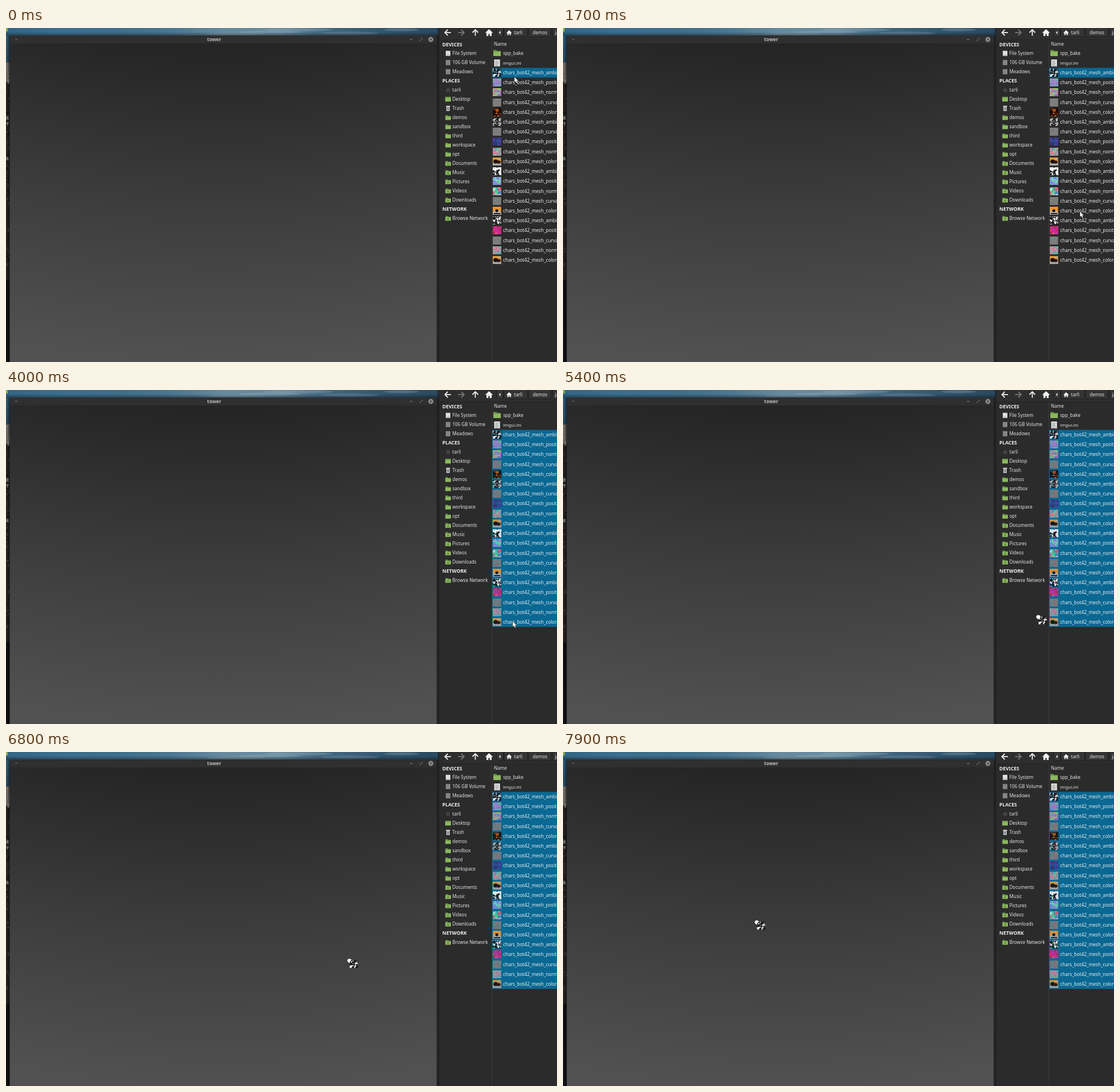
An HTML page with a canvas for the animation above (8 s loop, 961 px wide and 583 px high).

```html
<!DOCTYPE html>
<html lang="en">
<head>
<meta charset="utf-8">
<title>Drag files</title>
<style>
html, body { margin: 0; width: 100%; height: 100%; overflow: hidden; background: #2b2b2b; }
canvas { display: block; }
</style>
</head>
<body>
<canvas id="stage" width="961" height="583"></canvas>
<script>
const W = 961, H = 583, LOOP = 8000, STEP = 100, ROW = 17.21, FIRST_ROW = 78;
const SELECT_AT = 4000, DRAG_AT = 4900, FONT = '"Noto Sans", "Open Sans", sans-serif';
const screen = document.getElementById('stage').getContext('2d');
let g = screen;

// Pointer positions: [ms, x, y]
const arrowPath = [[0, 886, 85], [400, 891, 78], [1000, 891, 78], [1100, 892, 81], [1300, 898, 130],
  [1500, 905, 220], [1700, 901, 320], [1900, 891, 384], [2400, 883, 403.5]];
const dragPath = [[4900, 871, 397], [5400, 824, 392], [5700, 779, 391], [6200, 716, 384],
  [6600, 650, 373], [6800, 593.5, 360], [7500, 393, 318], [7900, 333, 293]];

const palettes = {
  ambi: ['#151515', '#fff', '#eee', '#111', '#ddd', '#222'],
  spots: ['#0a0a0a', '#fff', '#111', '#eee', '#000'],
  dim: ['#222', '#ccc', '#555', '#111', '#999'],
  curva: ['#7c7c7c', '#838383', '#767676', '#888'],
  iris: ['#8f8fc0', '#b07ad0', '#70b498', '#a884d4', '#7c7ad0', '#98a8a8'],
  norm: ['#b48cb0', '#e0569a', '#40b8a8', '#7c70d8', '#e09a60', '#8cd078'],
  pale: ['#9a9aa0', '#e07c98', '#58b4a8', '#8078c0', '#c4b088'],
  fire: ['#1c0a06', '#120404', '#c86418', '#481408', '#1c0804'],
  navy: ['#38388c', '#4a3a9c', '#2c4c94', '#56429c', '#34346c'],
  mint: ['#8c7cd8', '#60d890', '#a488e0', '#70e0b0', '#7c8ce0'],
  vivid: ['#9ca8b0', '#30c8a0', '#e05070', '#d8e8d0', '#4878d8', '#40d880'],
  rose: ['#d02c70', '#e03c50', '#c430a0', '#e85088', '#b82850'],
  rust: ['#e09a38'],
  amber: ['#f0962c'],
};
const files = [['ambient', 'ambi'], ['position', 'iris'], ['normal', 'norm'], ['curvature', 'curva'], ['color', 'fire'],
  ['ambient', 'dim'], ['curvature', 'curva'], ['position', 'navy'], ['normal', 'pale'], ['color', 'rust'],
  ['ambient', 'spots'], ['position', 'mint'], ['normal', 'vivid'], ['curvature', 'curva'], ['color', 'amber'],
  ['ambient', 'ambi'], ['position', 'rose'], ['curvature', 'curva'], ['normal', 'pale'], ['color', 'rust']];
const places = ['#DEVICES', 'File System', '106 GB Volume', 'Meadows', '#PLACES', 'tarli', 'Desktop', 'Trash',
  'demos', 'sandbox', 'third', 'workspace', 'opt', 'Documents', 'Music', 'Pictures', 'Videos', 'Downloads',
  '#NETWORK', 'Browse Network'];

function random(seed) {
  return () => {
    seed = (seed + 0x6d2b79f5) | 0;
    let n = Math.imul(seed ^ (seed >>> 15), seed | 1);
    n ^= n + Math.imul(n ^ (n >>> 7), n | 61);
    return ((n ^ (n >>> 14)) >>> 0) / 4294967296;
  };
}

function rect(x, y, w, h, color) {
  g.fillStyle = color;
  g.fillRect(x, y, w, h);
}

function text(str, x, y, color = '#e4e4e4', size = 8, weight = 400, align = 'left') {
  g.font = `${weight} ${size}px ${FONT}`;
  g.textAlign = align;
  g.fillStyle = color;
  g.fillText(str, x, y + 3);
}

function shape(x, y, points, fill, stroke, close = true, width = 1) {
  g.beginPath();
  for (let i = 0; i < points.length; i += 2) g.lineTo(x + points[i], y + points[i + 1]);
  if (close) g.closePath();
  g.lineWidth = width;
  if (stroke) { g.strokeStyle = stroke; g.stroke(); }
  if (fill) { g.fillStyle = fill; g.fill(); }
}

function disc(x, y, rx, ry, color) {
  g.beginPath();
  g.ellipse(x, y, rx, ry, 0, 0, 7);
  g.fillStyle = color;
  g.fill();
}

function ramp(x0, y0, x1, y1, colors) {
  const grad = g.createLinearGradient(x0, y0, x1, y1);
  colors.forEach((c, i) => grad.addColorStop(i / (colors.length - 1), c));
  return grad;
}

// Charred patch on an orange and grey ground
function drawColorMap(x, y, kind) {
  rect(x, y + 9, 15, 5, '#a8a8a8');
  if (kind === 'amber') {
    disc(x + 7, y + 10, 6, 4, '#b4b4b4');
    disc(x + 7, y + 7, 2.6, 2.4, '#151010');
    rect(x + 2, y + 11, 11, 2, '#2a1a14');
  } else {
    disc(x + 5, y + 7, 4, 3.6, '#1c0c08');
    disc(x + 10, y + 8, 3.6, 2.8, '#2c100a');
    rect(x + 10, y + 1, 4, 3, '#b0a89c');
  }
}

function thumb(x, y, kind, seed) {
  const colors = palettes[kind], rnd = random(seed * 7919), noise = kind === 'curva';
  const size = /iris|mint|rose|navy|spots/.test(kind) ? 2.3 : noise ? 0.8 : 1.5;
  g.save();
  g.beginPath();
  g.rect(x, y, 14.5, 14);
  g.clip();
  rect(x, y, 15, 14, colors[0]);
  if (colors.length === 1) drawColorMap(x, y, kind);
  else for (let i = 0; i < 70; i++) {
    const r = size * (0.5 + rnd());
    disc(x + rnd() * 15, y + rnd() * 14, r, r * (0.6 + rnd() * 0.7), colors[Math.floor(rnd() * colors.length)]);
  }
  g.restore();
}

function folder(x, y, w, h) {
  rect(x, y, w * 0.45, h, '#6f9a48');
  rect(x, y + h * 0.15, w, h * 0.85, '#6f9a48');
  rect(x, y + h * 0.3, w, h * 0.7, '#8db85f');
}

function house(x, y, s, color) {
  shape(x, y, [0, -s, s * 1.15, 0.1 * s, s * 0.75, 0.1 * s, s * 0.75, s, s * 0.2, s, s * 0.2, s * 0.4,
    -s * 0.2, s * 0.4, -s * 0.2, s, -s * 0.75, s, -s * 0.75, 0.1 * s, -s * 1.15, 0.1 * s], color);
}

function toolbarArrow(x, y, angle, color) {
  g.save();
  g.translate(x, y);
  g.rotate(angle);
  shape(0, 0, [0, -5, -5, 0, 0, 5], null, color, false, 1.8);
  shape(0, 0, [-4, 0, 5.5, 0], null, color, false, 1.8);
  g.restore();
}

function drawDesktop() {
  rect(0, 0, 756, 14, ramp(0, 0, 756, 0,
    ['#336683', '#3c6f8e', '#3e6e8b', '#4a7690', '#668a9e', '#668a9e', '#41667f', '#33566f', '#2a495f']));
  g.save();
  g.beginPath();
  g.rect(0, 0, 756, 13);
  g.clip();
  for (const [x, y, rx] of [[460, 7, 55], [510, 3, 60], [400, 10, 50], [600, 9, 50], [690, 3, 30]])
    disc(x, y, rx, 2.5, 'rgba(160,184,194,.28)');
  g.restore();
  rect(0, 7, 756, 7, ramp(0, 7, 0, 14, ['rgba(10,20,28,0)', 'rgba(10,20,28,.5)']));

  rect(0, 13, 7, 50, ramp(0, 13, 0, 63, ['#2f5b77', '#26475d']));
  rect(0, 60, 7, 35, '#6d6761');
  rect(0, 94, 7, 346, '#26211f');
  rect(0, 440, 7, 143, '#101114');
  const rnd = random(77);
  for (let i = 0; i < 130; i++) {
    const y = 62 + rnd() * 370, v = Math.floor(rnd() * 60) + (y < 94 ? 110 : 18);
    rect(rnd() * 4, y, 1 + rnd() * 2, 1 + rnd() * 3, `rgb(${v},${v * 0.92},${v * 0.87})`);
  }
  text('git', 5, 157, '#e8e8e8', 8, 400, 'right');
  text('rr', 5, 167, '#e8e8e8', 8, 400, 'right');
  text('git', 5, 228, '#e8e8e8', 8, 400, 'right');
  rect(0, 0, 3, 6, '#8fb04a');
  rect(2, 13, 5, 570, ramp(2, 0, 7, 0, ['rgba(0,0,0,0)', 'rgba(0,0,0,.55)']));
}

function drawWindow() {
  g.beginPath();
  g.roundRect(6.5, 13, 746, 20, [4, 4, 0, 0]);
  g.fillStyle = '#2f2f2f';
  g.fill();
  const shade = g.createRadialGradient(377, -1300, 1327, 377, -1300, 1883);
  shade.addColorStop(0, '#242424');
  shade.addColorStop(0.5, '#3c3c3c');
  shade.addColorStop(1, '#515151');
  rect(6.5, 27, 746, 556, shade);
  text('tower', 363, 20, '#bdbdbd', 8.3, 700, 'center');
  shape(18, 19.5, [-2, -1, 0, 1, 2, -1], null, '#888', false);
  rect(704.5, 19.5, 4, 1, '#999');
  shape(724, 20, [0, -2, 2, -2, 2, 0], null, '#888', false, 0.8);
  shape(724, 20, [-2, 0, -2, 2, 0, 2], null, '#888', false, 0.8);
  disc(741, 20, 4.4, 4.4, '#8c8c8c');
  shape(741, 20, [-1.6, -1.6, 1.6, 1.6], null, '#2f2f2f', false);
  shape(741, 20, [1.6, -1.6, -1.6, 1.6], null, '#2f2f2f', false);
}

function drawPlaceIcon(i, y) {
  if (i === 1) {
    rect(767, y - 4.5, 8, 9, '#dcdcdc');
    rect(768, y + 2.5, 6, 1, '#aaa');
  } else if (i < 4) rect(767, y - 4.5, 8, 9, '#858585');
  else if (i === 5) house(771, y, 4, '#444');
  else if (i === 6) {
    rect(766, y - 4, 10, 8, '#8db85f');
    rect(766, y - 4, 10, 2, '#6f9a48');
  } else if (i === 7) {
    rect(767.5, y - 4.5, 7, 2, '#ddd');
    rect(768, y - 2, 6, 6.5, '#c4c8cc');
    rect(769.5, y - 0.5, 3, 3, '#667');
  } else {
    folder(766.5, y - 4, 9.5, 8);
    if (i > 12) rect(769.5, y, 3, 2.5, '#5b803b');
  }
}

function drawFileManager() {
  rect(755, 0, 206, 583, '#2b2b2b');
  rect(750, 13, 7, 570, ramp(750, 0, 757, 0, ['rgba(32,32,32,0)', 'rgba(32,32,32,.9)', 'rgba(32,32,32,.9)', 'rgba(36,36,36,0)']));
  rect(753, 0, 3, 13, '#1e2a32');
  rect(756, 0, 205, 20, '#2e2e2e');
  rect(756, 20, 205, 1, '#252525');
  rect(847, 21, 1, 562, '#3a3a3a');

  toolbarArrow(770.5, 8, 0, '#f0f0f0');
  toolbarArrow(794, 8, Math.PI, '#777');
  toolbarArrow(818.5, 8, Math.PI / 2, '#f0f0f0');
  house(842.5, 8, 6, '#f0f0f0');
  for (const [x, w] of [[855, 12], [868, 41], [911, 39], [953, 20]]) {
    g.beginPath();
    g.roundRect(x + 0.5, -4.5, w, 20, 2);
    g.fillStyle = '#343434';
    g.fill();
    g.strokeStyle = '#1e1e1e';
    g.lineWidth = 1;
    g.stroke();
  }
  shape(861.5, 8, [-2, 0, 1, -3, 1, 3], '#ddd');
  house(877.5, 8, 4.2, '#eee');
  text('tarli', 886, 8);
  text('demos', 918.5, 8);
  text('jam', 957.5, 8);

  places.forEach((name, i) => {
    const y = 28 + 16 * i + (i ? 0.3 : 0.5);
    if (name[0] === '#') return text(name.slice(1), 761, y, '#eee', 8.5, 700);
    drawPlaceIcon(i, y);
    text(name, 778.5, y);
  });
}

function drawFiles(allSelected) {
  text('Name', 851, 28);
  folder(850, 38.5, 13, 10.5);
  text('spp_bake', 867, 44);
  rect(851.5, 55, 10, 12, '#ececec');
  for (let y = 57; y < 66; y += 2) rect(853, y, y % 4 === 1 ? 7 : 5.5, 0.9, '#888');
  text('imgui.ini', 867, 61, '#e4e4e4', 7.8);

  rect(848, 69.6, 113, ROW * (allSelected ? files.length : 1) - 0.3, '#0a6893');
  files.forEach(([name, kind], i) => {
    const y = FIRST_ROW + i * ROW, top = Math.round(y - 7);
    thumb(849, top, kind, i + 1);
    if (allSelected || i === 0) rect(849, top, 14.5, 14, 'rgba(10,103,145,.12)');
    text('chars_bot42_mesh_' + name, 867, y, '#ebebeb', 8.1);
  });
}

function positionOn(path, t) {
  const next = path.findIndex(p => p[0] > t);
  if (next < 0) return path[path.length - 1].slice(1);
  const [t0, x0, y0] = path[next - 1], [t1, x1, y1] = path[next], u = (t - t0) / (t1 - t0);
  return [x0 + (x1 - x0) * u, y0 + (y1 - y0) * u];
}

function drawArrow(x, y) {
  shape(x + 0.8, y + 0.6, [0, 0, 0, 9, 2, 7.2, 3.7, 10.6, 5.2, 9.9, 3.6, 6.6, 6.3, 6.4], '#fff', '#111');
}

function drawDrag(x, y) {
  x = Math.round(x);
  y = Math.round(y);
  g.globalAlpha = 0.85;
  thumb(x + 5, y + 3, 'ambi', 1);
  g.globalAlpha = 1;
  shape(x, y, [1, 4, 2.2, 1.8, 4, 0.8, 6.5, 1, 8.6, 2.4, 8.6, 5.5, 7.2, 7.8, 3.2, 7.8], '#fff', '#151515');
  if (x < 753) {
    rect(x + 6, y + 5, 5, 3, '#111');
    rect(x + 7, y + 4, 3, 5, '#111');
    rect(x + 7, y + 6, 3, 1, '#fff');
    rect(x + 8, y + 5, 1, 3, '#fff');
  }
}

function makeScene(allSelected) {
  const canvas = document.createElement('canvas');
  canvas.width = W;
  canvas.height = H;
  g = canvas.getContext('2d');
  drawDesktop();
  drawWindow();
  drawFileManager();
  drawFiles(allSelected);
  g = screen;
  return canvas;
}

const scenes = [makeScene(false), makeScene(true)];

function frame() {
  const t = Math.floor(performance.now() % LOOP / STEP) * STEP;
  g.drawImage(scenes[t < SELECT_AT ? 0 : 1], 0, 0);
  if (t < DRAG_AT) drawArrow(...positionOn(arrowPath, t));
  else drawDrag(...positionOn(dragPath, t));
  requestAnimationFrame(frame);
}
frame();
</script>
</body>
</html>
```
